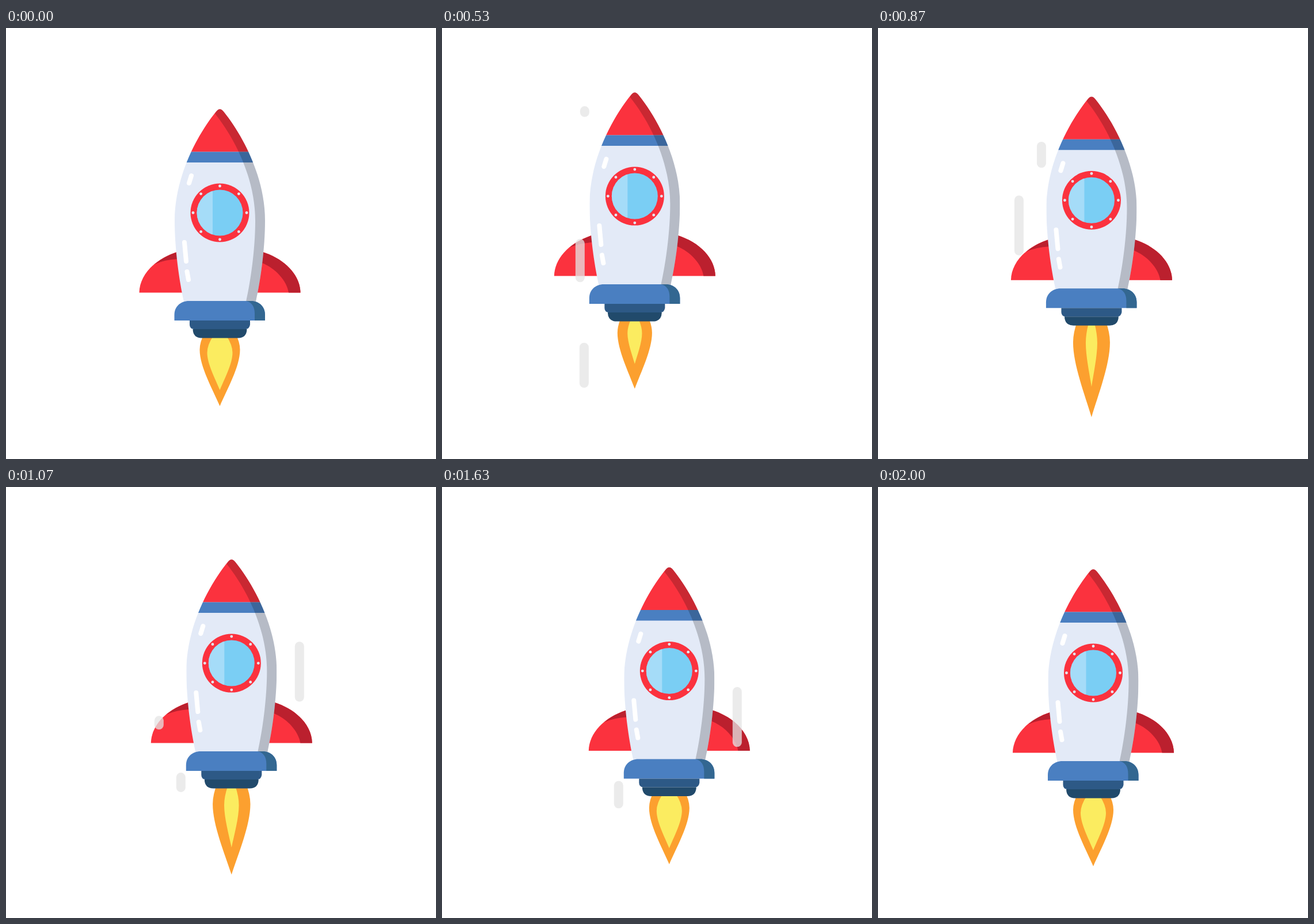
An HTML page for the animation above (2030 ms loop, 747 by 750 pixels).

```html
<!DOCTYPE html>
<html lang="en">
<head>
<meta charset="utf-8">
<title>Rocket</title>
<style>
html, body { margin: 0; width: 100%; height: 100%; overflow: hidden; background: #fff; }
svg { display: block; width: 100vw; height: 100vh; }
</style>
</head>
<body>
<svg viewBox="0 0 747 750">
  <defs>
    <clipPath id="hull">
      <path d="M364.500 146Q371.500 136.500 378.500 146C412 188 450 260 450 335C450 385 442 440 434 476H309C301 440 293 385 293 335C293 260 331 188 364.500 146Z"/>
    </clipPath>
    <clipPath id="pane"><circle cx="371.5" cy="321.5" r="40"/></clipPath>
  </defs>
  <g id="rocket">
    <path id="outer" fill="#fca02f"/>
    <path id="inner" fill="#fbec60"/>

    <g fill="#fb323e">
      <path d="M231.500 460.500C232 430 258 402 298 389.500L312 460.500Z"/>
      <path d="M511.500 460.500C511 430 485 402 445 389.500L431 460.500Z"/>
    </g>
    <g fill="#bb202e">
      <path d="M298 389.500Q275 397 258 411Q276 403 298 402Z"/>
      <path d="M445 389.500C485 402 511 430 511.500 460.500H491C488 440 468 418 445 409Z"/>
    </g>

    <g clip-path="url(#hull)">
      <path fill="#e3eaf7" d="M290 130H455V480H290Z"/>
      <path fill="#fb323e" d="M290 130H455V215.500H290Z"/>
      <path fill="#4a7fc1" d="M290 215.500H455V234H290Z"/>
      <path fill-opacity=".2" d="M363 149C400 195 433 265 433 335C433 385 425 440 417 476H455V130H376Z"/>
    </g>

    <path fill="#4a7fc1" d="M292.500 509V499C292.500 485 303 475 318 475H425C440 475 450 485 450 499V509Z"/>
    <path fill="#336791" d="M417 475C427 477 432 485 432 497V509H450V499C450 485 440 475 425 475Z"/>
    <path fill="#2d5986" d="M319 509H424V516Q423 523 417 524H326Q319 523 319 516Z"/>
    <path fill="#214a6b" d="M324.500 524H418.500Q418 539.500 403 539.500H340Q325 539.500 324.500 524Z"/>

    <circle cx="371.5" cy="321.5" r="51" fill="#fb323e"/>
    <g clip-path="url(#pane)">
      <path fill="#7acef4" d="M330 280H414V364H330Z"/>
      <path fill="#a5dcf8" d="M330 280H359V364H330Z"/>
    </g>
    <g id="rivets" fill="#e3eaf7"></g>
    <path fill="none" stroke="#fff" stroke-width="8" stroke-linecap="round"
      d="M322 257L318 270M310 373L313 406M314.500 424L317 438"/>
    <g id="streaks" stroke="#e4e4e4" stroke-opacity=".75" stroke-width="16" stroke-linecap="round"></g>
  </g>
</svg>
<script>
const LOOP = 2030, FRAME = 100 / 3, CX = 371.5, TOP = 141;
const $ = id => document.getElementById(id);
const clamp = u => Math.max(0, Math.min(1, u));
const linear = u => u;
const smooth = u => u * u * (3 - 2 * u);

// time, nose x, nose y
const path = [
  [0, CX, TOP], [530, 334.5, 112], [870, 371.3, 119.3],
  [1270, 413, 133], [1630, 395, 139.5], [2000, 374, 143]
];

// time, then half width and tip of the outer and the inner flame
const calm = [35, 658, 22, 630];
const flame = [[0, ...calm], [310, 29, 634, 14, 596], [870, 32, 699, 10, 646], [1500, ...calm]];

// x and y relative to the nose, start
const streaks = [
  [107, 160, 56], [-88, 371, 228], [-95, 255, 415], [-87, 24, 525, 84], [-126, 153, 652],
  [118, 132, 868], [-88, 371, 1031], [118, 189, 1418], [-88, 372, 1570]
];
const LIFE = 430, LAG = .41;

// Values at time t between keys; the last key leads back to the first.
function sample(keys, t, ease) {
  const i = keys.findLastIndex(k => k[0] <= t);
  const a = keys[i], b = keys[i + 1] || [LOOP, ...keys[0].slice(1)];
  const u = ease(clamp((t - a[0]) / (b[0] - a[0])));
  return a.map((v, n) => v + (b[n] - v) * u).slice(1);
}

function tongue(w, tip, wide, top, neck) {
  const x = f => CX + f * w;
  const third = (tip - wide) * .3, bend = top + (wide - top) * .55;
  return `M${x(-neck)} ${top}Q${x(-1)} ${bend} ${x(-1)} ${wide}` +
    `C${x(-1)} ${wide + third} ${x(-.36)} ${tip - third} ${CX} ${tip}` +
    `C${x(.36)} ${tip - third} ${x(1)} ${wide + third} ${x(1)} ${wide}` +
    `Q${x(1)} ${bend} ${x(neck)} ${top}Z`;
}

// The head leads, the tail follows the same way later.
function streak([dx, y, start, travel = 127], t) {
  const u = (t - start) / LIFE;
  if (u < 0 || u >= 1) return "";
  const at = p => TOP + y + 8 + clamp(p / (1 - LAG)) * travel;
  return `<path d="M${CX + dx} ${at(u - LAG)}V${at(u) + .01}"/>`;
}

for (let i = 0; i < 8; i++) {
  const a = i * Math.PI / 4;
  $("rivets").innerHTML +=
    `<circle cx="${CX + 46.5 * Math.cos(a)}" cy="${321.5 + 46.5 * Math.sin(a)}" r="2.4"/>`;
}

const begin = performance.now();
function draw(now) {
  const clock = Math.max(0, now - begin) % LOOP;
  const t = Math.floor((clock + 3.5) / FRAME) % 61 * FRAME;
  const [x, y] = sample(path, t, linear);
  const [ow, otip, iw, itip] = sample(flame, t, smooth);
  $("rocket").setAttribute("transform", `translate(${x - CX} ${y - TOP})`);
  $("outer").setAttribute("d", tongue(ow, otip, .22 * otip + 415, 530, .75));
  $("inner").setAttribute("d", tongue(iw, itip, .3 * itip + 376, 535, .5));
  $("streaks").innerHTML = streaks.map(s => streak(s, t)).join("");
  requestAnimationFrame(draw);
}
draw(begin);
</script>
</body>
</html>
```
